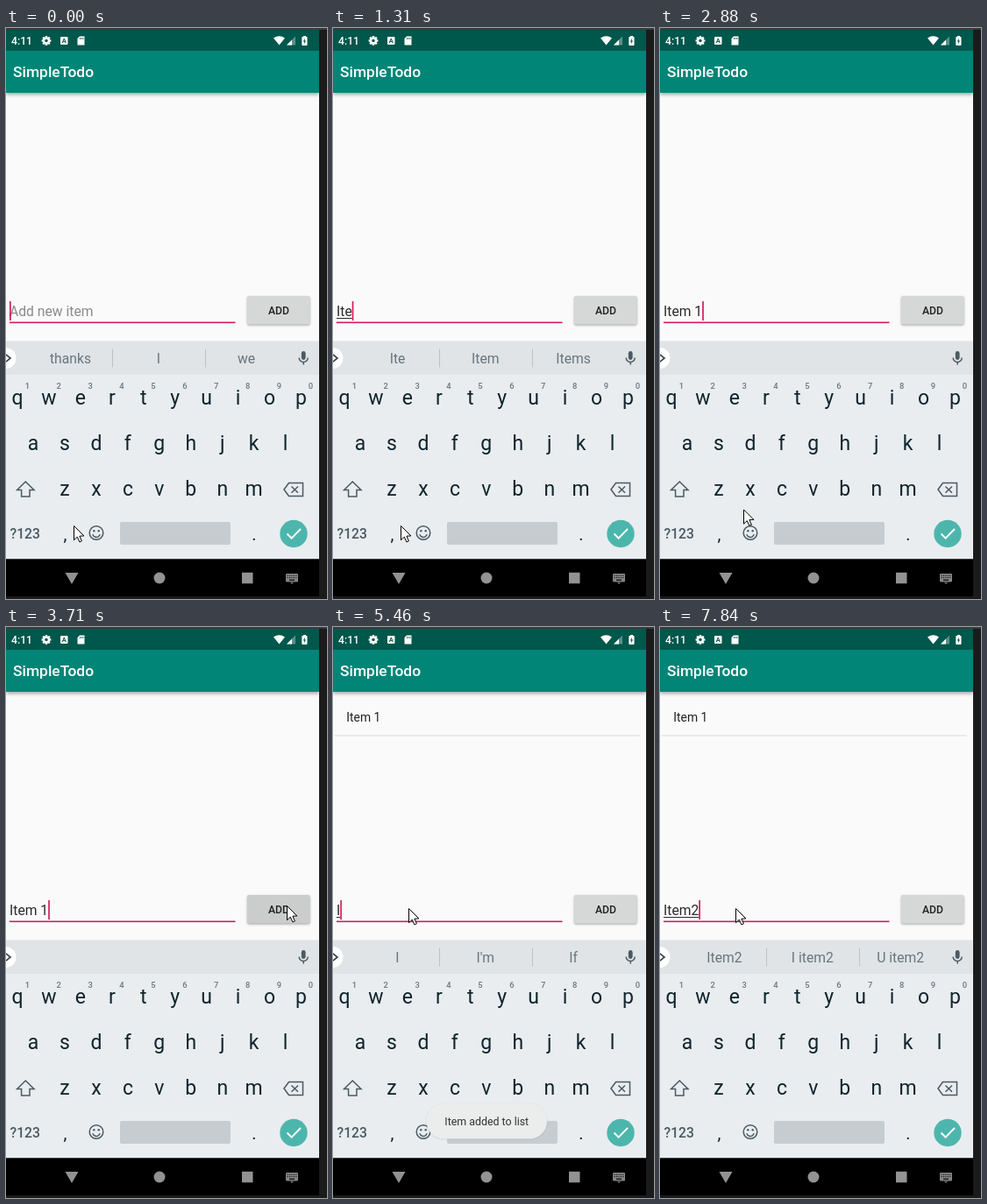
Animation, 366 px wide and 652 px high, one loop 8000 ms. Source, as an HTML page with a canvas:

```html
<!DOCTYPE html>
<html lang="en">
<head>
<meta charset="utf-8">
<title>Todo list</title>
<style>
  html, body { margin: 0; width: 100%; height: 100%; overflow: hidden; background: #1b1b1c; }
  canvas { display: block; width: 366px; height: 652px; }
</style>
</head>
<body>
<canvas id="stage"></canvas>
<script>
const W = 366, H = 652, LOOP = 8000, PHONE = 357;
const canvas = document.getElementById('stage');
const dpr = window.devicePixelRatio || 1;
canvas.width = W * dpr;
canvas.height = H * dpr;
const ctx = canvas.getContext('2d');

const INK = '#10242c', GREY = '#4b5a62', PINK = '#d81b60', KEYS = '#e9edf0';
const START = ['thanks', 'I', 'we'];

// [time, field text, suggestions, composing underline]
const typing = [
  [0, '', START],
  [920, 'I', ['I', "I'm", 'If'], true],
  [1070, 'It', ['It', "It's", 'Its'], true],
  [1200, 'Ite', ['Ite', 'Item', 'Items'], true],
  [1350, 'Item', ['Item', 'Items', 'Itemized'], true],
  [1500, 'Item ', ['is', 'was', 'in']],
  [1690, 'Item 1', null],
  [3860, '', START],
  [5330, 'I', ['I', "I'm", 'If'], true],
  [7200, 'It', ['It', "It's", 'Its'], true],
  [7390, 'Ite', ['Ite', 'Item', 'Items'], true],
  [7570, 'Item', ['Item', 'Items', 'Itemized'], true],
  [7840, 'Item2', ['Item2', 'I item2', 'U item2'], true]
];
const blinks = [400, 920, 2210, 2610, 3010, 3410, 4130, 4400, 4800, 5330, 5730, 6130, 6520, 7050];

const clamp = v => Math.max(0, Math.min(1, v));
const ramp = (t, a, b) => clamp((t - a) / (b - a));
const ease = u => u * u * (3 - 2 * u);
const stepped = (t, a, b, n) => Math.floor(ramp(t, a, b) * n + 1e-6) / n;

function rect(x, y, w, h, fill) {
  ctx.fillStyle = fill;
  ctx.fillRect(x, y, w, h);
}

function round(x, y, w, h, r, fill) {
  ctx.beginPath();
  ctx.moveTo(x + r, y);
  ctx.arcTo(x + w, y, x + w, y + h, r);
  ctx.arcTo(x + w, y + h, x, y + h, r);
  ctx.arcTo(x, y + h, x, y, r);
  ctx.arcTo(x, y, x + w, y, r);
  ctx.closePath();
  ctx.fillStyle = fill;
  ctx.fill();
}

function disc(x, y, r, fill) {
  ctx.beginPath();
  ctx.arc(x, y, r, 0, Math.PI * 2);
  ctx.fillStyle = fill;
  ctx.fill();
}

function shape(points, fill, stroke, width = 1, closed = true) {
  ctx.beginPath();
  for (let i = 0; i < points.length; i += 2) ctx.lineTo(points[i], points[i + 1]);
  if (closed) ctx.closePath();
  if (fill) { ctx.fillStyle = fill; ctx.fill(); }
  if (stroke) { ctx.strokeStyle = stroke; ctx.lineWidth = width; ctx.stroke(); }
}

function setFont(size, weight = 400) {
  ctx.font = `${weight} ${size}px Roboto, sans-serif`;
}

function text(str, x, y, size, color, weight = 400, align = 'left') {
  setFont(size, weight);
  ctx.textAlign = align;
  ctx.fillStyle = color;
  ctx.fillText(str, x, y);
}

function shadowed(blur, dy, color, draw) {
  ctx.save();
  ctx.shadowBlur = blur * dpr;
  ctx.shadowOffsetY = dy * dpr;
  ctx.shadowColor = color;
  draw();
  ctx.restore();
}

function statusBar() {
  rect(0, 0, W, 2, '#3a3b3d');
  rect(0, 2, PHONE, 24, '#00574b');
  text('4:11', 6, 19, 12.2, '#fff', 500);

  for (let i = 0; i < 8; i++) {
    ctx.save();
    ctx.translate(46, 14.5);
    ctx.rotate(i * Math.PI / 4);
    rect(-1.2, -5.4, 2.4, 3, '#fff');
    ctx.restore();
  }
  disc(46, 14.5, 4.2, '#fff');
  disc(46, 14.5, 1.7, '#00574b');

  round(62, 10, 8.5, 9, 1, '#fff');
  text('A', 66.25, 17.3, 7.5, '#00574b', 700, 'center');

  shape([84, 9.5, 89.5, 9.5, 89.5, 19.5, 81.5, 19.5, 81.5, 12], '#fff');
  for (let i = 0; i < 3; i++) rect(84 + i * 1.8, 11, 0.8, 2, '#00574b');

  ctx.beginPath();
  ctx.moveTo(311.5, 19.5);
  ctx.lineTo(305, 11.5);
  ctx.quadraticCurveTo(311.5, 7, 318, 11.5);
  ctx.closePath();
  ctx.fillStyle = '#fff';
  ctx.fill();
  shape([320, 19.5, 330, 9.5, 330, 19.5], 'rgba(255,255,255,.35)');
  shape([320, 19.5, 326, 13.5, 326, 19.5], '#fff');
  rect(339, 9, 3, 1.5, '#fff');
  round(337.3, 10, 6.2, 10, 0.8, '#fff');
  shape([341, 11.5, 338.8, 15.6, 340.2, 15.6, 339.8, 18.5, 342, 14.4, 340.6, 14.4], '#00574b');
}

function appBar() {
  shadowed(4, 1.5, 'rgba(0,0,0,.35)', () => rect(0, 26, PHONE, 48, '#008577'));
  statusBar();
  text('SimpleTodo', 8, 56.3, 17.4, '#fff', 500);
}

function addButton(pressed) {
  shadowed(2.5, 1, 'rgba(0,0,0,.35)', () =>
    round(275, 306, 71.5, 32.5, 2, pressed ? '#cbcccc' : '#d6d7d7'));
  text('ADD', 311, 327, 12.2, '#212121', 500, 'center');
}

function field(str, composing, caret) {
  if (str) text(str, 4, 329.3, 15.7, '#2a2a2a');
  else text('Add new item', 4, 329.3, 15.7, '#8a8a8a');
  setFont(15.7);
  const end = 4 + ctx.measureText(str).width;
  if (composing) rect(4, 331, end - 4, 1, '#2a2a2a');
  rect(4, 335.5, 257.5, 1.6, PINK);
  if (caret) rect(end, 312, 1.7, 22, PINK);
}

function suggestions(words) {
  rect(0, 357.5, PHONE, 38.5, '#e0e4e7');
  disc(-0.5, 377, 12, '#fff');
  shape([0, 373, 5, 377, 0, 381], null, '#37474f', 1.7, false);
  if (words) {
    words.forEach((w, i) => text(w, 73.5 + i * 100.3, 383, 15.7, '#68757c', 400, 'center'));
    rect(121, 366.5, 1, 21, '#bcc3c7');
    rect(227, 366.5, 1, 21, '#bcc3c7');
  }
  round(336.8, 369, 4.8, 10, 2.4, GREY);
  ctx.beginPath();
  ctx.arc(339.2, 376.4, 5, 0, Math.PI);
  ctx.strokeStyle = GREY;
  ctx.lineWidth = 1.5;
  ctx.stroke();
  rect(338.5, 381, 1.5, 3.5, GREY);
}

function smiley(x, y) {
  ctx.strokeStyle = GREY;
  ctx.lineWidth = 1.5;
  ctx.beginPath();
  ctx.arc(x, y, 7.8, 0, Math.PI * 2);
  ctx.stroke();
  disc(x - 2.7, y - 2.2, 1.2, GREY);
  disc(x + 2.7, y - 2.2, 1.2, GREY);
  ctx.beginPath();
  ctx.arc(x, y + 0.6, 4.3, 0.25, Math.PI - 0.25);
  ctx.stroke();
}

function keyboard(shift) {
  rect(0, 396, PHONE, 210.5, KEYS);
  const rows = [['qwertyuiop', 13], ['asdfghjkl', 31], ['zxcvbnm', 67]];
  rows.forEach(([keys, x0], r) => {
    [...keys].forEach((k, i) => text(shift ? k.toUpperCase() : k,
      x0 + i * 35.95, 430 + r * 52 + (shift ? 1.5 : 0), 23, INK, 400, 'center'));
  });
  for (let i = 0; i < 10; i++)
    text((i + 1) % 10, 24.3 + i * 35.9, 412.3, 9.4, '#6a767d', 500, 'center');

  shape([22.3, 518, 32, 527.5, 27, 527.5, 27, 535, 17.6, 535, 17.6, 527.5, 12.6, 527.5],
    shift ? GREY : null, GREY, 1.5);
  shape([317, 527, 322.5, 519.5, 338.5, 519.5, 338.5, 534.5, 322.5, 534.5], null, GREY, 1.5);
  shape([325.5, 523.5, 333, 530.7], null, GREY, 1.5, false);
  shape([333, 523.5, 325.5, 530.7], null, GREY, 1.5, false);

  text('?123', 4.5, 582.5, 15.7, GREY, 500);
  text(',', 67.5, 585, 20, INK, 400, 'center');
  smiley(103, 576.5);
  round(130, 564, 126, 26, 2, '#c7ccd0');
  text('.', 283, 585, 20, INK, 400, 'center');
  disc(328, 577.5, 15.7, '#4db6ac');
  shape([320.5, 577.5, 325.6, 582.6, 336, 572], null, '#fff', 1.9, false);
}

function navBar() {
  rect(0, 606.5, PHONE, 42.5, '#000');
  const c = '#929292';
  shape([67.5, 622, 82.5, 622, 75, 635], c);
  disc(175, 628, 6.5, c);
  rect(269, 621.8, 12.5, 12.5, c);
  round(319, 623, 14, 9.5, 1, '#858585');
  for (let r = 0; r < 2; r++)
    for (let i = 0; i < 5; i++) rect(320.6 + i * 2.4, 624.7 + r * 2.4, 1.1, 1.1, '#000');
  rect(323, 629.8, 6, 1.1, '#000');
  shape([324, 633.2, 328, 633.2, 326, 635], '#858585');
}

function toast(alpha) {
  if (!alpha) return;
  ctx.save();
  ctx.globalAlpha = alpha;
  shadowed(2, 0.5, 'rgba(0,0,0,.12)', () => round(106.5, 544, 137.5, 40.5, 20, '#ebecec'));
  text('Item added to list', 175.2, 568.5, 12.4, '#333', 400, 'center');
  ctx.restore();
}

function pointer(t) {
  const go = ease(stepped(t, 2610, 3460, 6));
  const back = ease(stepped(t, 4000, 4650, 5));
  const x = 77.5 + 243 * go - 234 * back;
  const y = 568.5 - 250 * go + 3 * back;
  ctx.save();
  ctx.translate(x, y);
  shape([0, 0, 0, 16.2, 3.8, 12.7, 6.4, 18.4, 8.9, 17.3, 6.4, 11.7, 11.4, 11.4],
    '#fff', '#000', 1);
  ctx.restore();
}

function render(t) {
  const [, str, words, composing] = typing.filter(e => e[0] <= t).pop();
  const caret = blinks.filter(b => b <= t).length % 2 === 0;
  ctx.setTransform(dpr, 0, 0, dpr, 0, 0);
  rect(0, 0, W, H, '#1b1b1c');
  rect(0, 26, PHONE, 332, '#fafafa');
  appBar();
  if (t >= 3860) {
    text('Item 1', 15.3, 107.7, 13.9, '#212121');
    rect(1.5, 123.5, 348, 1, '#d9d9d9');
  }
  field(str, composing, caret);
  addButton(t >= 3710 && t < 4000);
  suggestions(words);
  keyboard(t >= 800 && t < 920);
  navBar();
  toast(ramp(t, 3990, 4270) * (1 - ramp(t, 5740, 6130)));
  pointer(t);
  rect(PHONE, 2, W - PHONE, H - 2, '#1b1b1c');
}

const start = performance.now();
function tick() {
  render((performance.now() - start) % LOOP);
  requestAnimationFrame(tick);
}
tick();
</script>
</body>
</html>
```
